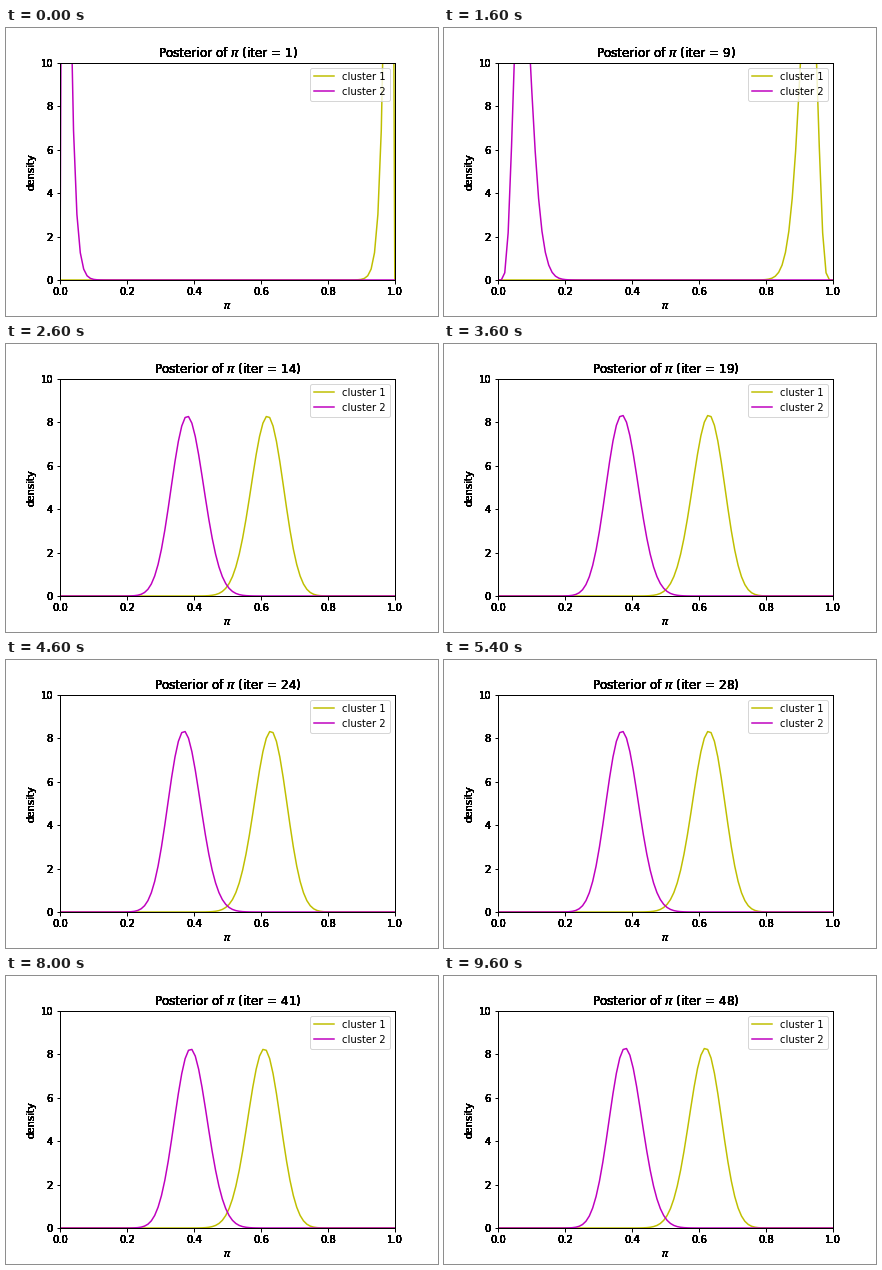
A matplotlib script for the animation above (9800 ms loop, 432 px wide and 288 px high).

```python
from math import comb

import matplotlib.pyplot as plt
import numpy as np
from matplotlib.animation import FuncAnimation

SAMPLES = 100
INTERVAL = 200
TEXT_PASSES = 12

# (successes of cluster 2, number of iterations it holds)
RUNS = [(1, 7), (3, 1), (7, 1), (13, 1), (22, 1), (31, 1), (38, 2),
        (37, 7), (38, 2), (37, 6), (38, 9), (39, 3), (38, 7)]
COUNTS = [k for k, length in RUNS for _ in range(length)]

x = np.linspace(0, 1, 100)


def posterior(k):
    """Beta density after k successes, with a uniform prior."""
    return (SAMPLES + 1) * comb(SAMPLES, k) * x**k * (1 - x)**(SAMPLES - k)


def solidify(text):
    """Draw a label repeatedly so that its soft edges turn solid."""
    draw_once = text.draw

    def draw(renderer):
        for _ in range(TEXT_PASSES):
            draw_once(renderer)

    text.draw = draw


fig, ax = plt.subplots(figsize=(6, 4), dpi=72)
fig.subplots_adjust(left=0.125, right=0.9, bottom=0.125, top=0.88)

line1, = ax.plot([], [], "y", label="cluster 1")
line2, = ax.plot([], [], "m", label="cluster 2")
ax.set(xlim=(0, 1), ylim=(0, 10), xlabel=r"$\pi$", ylabel="density")
ax.set_xticks(np.linspace(0, 1, 6))
ax.set_yticks(range(0, 11, 2))
ax.tick_params(width=1)
for spine in ax.spines.values():
    spine.set_linewidth(1)
ax.legend(loc="upper right")
title = ax.set_title("")

for label in (title, ax.xaxis.label, ax.yaxis.label,
              *ax.get_xticklabels(), *ax.get_yticklabels()):
    solidify(label)


def update(i):
    k = COUNTS[i]
    line1.set_data(x, posterior(SAMPLES - k))
    line2.set_data(x, posterior(k))
    title.set_text(rf"Posterior of $\pi$ (iter = {i + 1})")
    return line1, line2, title


anim = FuncAnimation(fig, update, frames=len(COUNTS), interval=INTERVAL,
                     repeat=True, repeat_delay=0)
plt.show()
```
